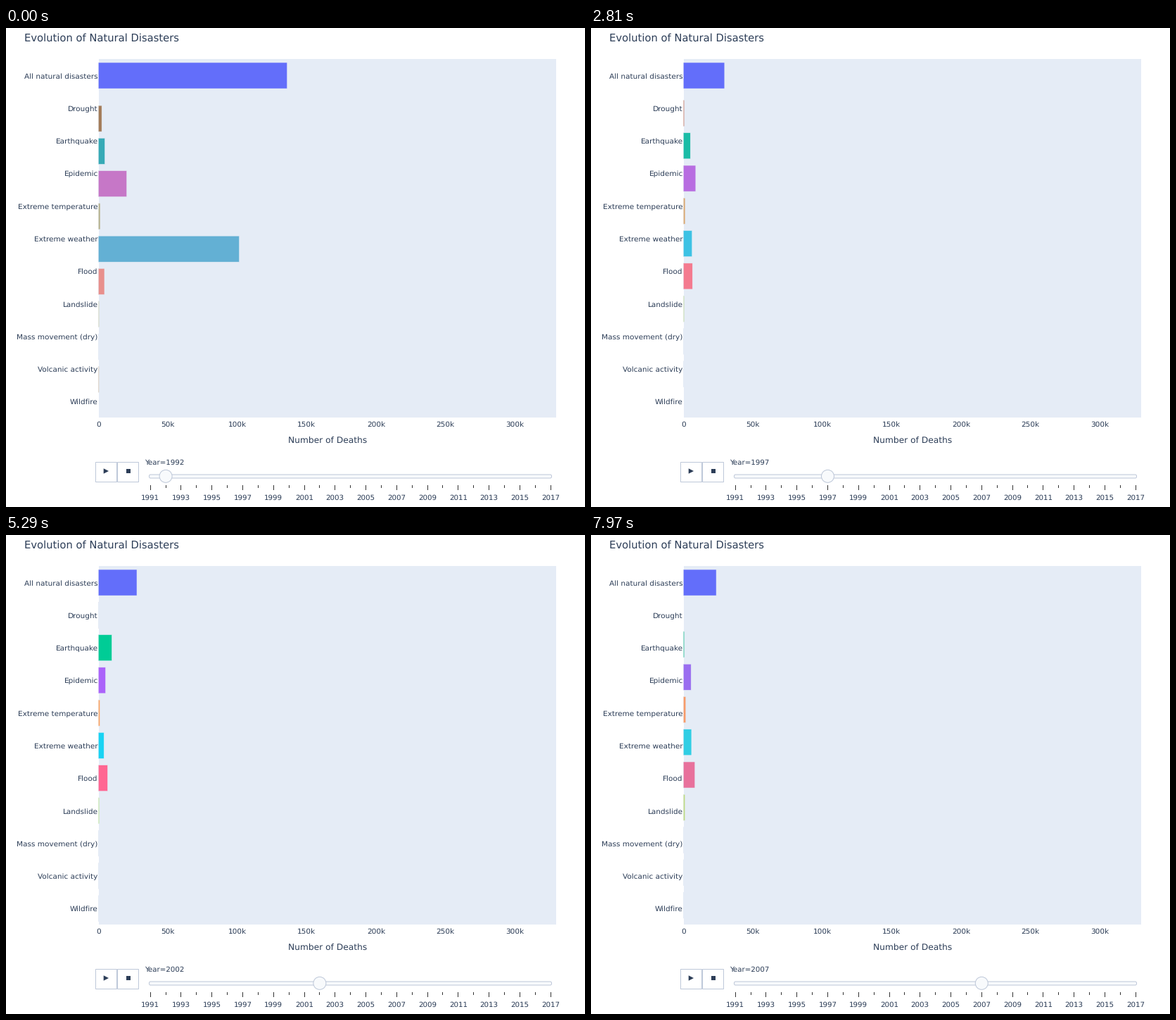
A matplotlib script that plays this animation: 823 px wide and 680 px high, repeating every 8000 ms.

```python
import numpy as np
import matplotlib.pyplot as plt
from matplotlib.animation import FuncAnimation
from matplotlib.colors import to_rgb
from matplotlib.patches import Circle, FancyBboxPatch, Polygon, Rectangle

W, H, DPI = 823, 680, 100
STEP, FRAMES = 40, 200
PT = 72 / DPI                     # points per pixel
INK, PLOT, BORDER, KNOB = "#2c3d57", "#E5ECF6", "#BEC8D9", "#F8FAFC"

X0, K = 131.3, 98.7 / 50          # zero line, pixels per thousand deaths
TOP, ROW, BAR = 44.4, 46.27, 37
TRACK, YEAR_STEP = 205.2, 21.88   # slider position of 1991, pixels per year
FADE = 500                        # length of one transition in ms

DROUGHT, QUAKE, EPIDEMIC, HEAT, STORM, FLOOD, SLIDE, DRY, VOLCANO, FIRE = NAMES = (
    "Drought", "Earthquake", "Epidemic", "Extreme temperature",
    "Extreme weather", "Flood", "Landslide", "Mass movement (dry)",
    "Volcanic activity", "Wildfire")
TOTAL = "All natural disasters"
ROWS = (TOTAL, *NAMES)
COLORS = [np.array(to_rgb(c)) for c in
          ("#636EFA", "#EF553B", "#00CC96", "#AB63FA", "#FFA15A", "#19D3F3",
           "#FF6692", "#B6E880", "#FF97FF", "#FECB52", "#636EFA")]

# Usual toll in thousands, drifting from the first year to the last
USUAL = {DROUGHT: (.2, .2), QUAKE: (3.4, 3.4), EPIDEMIC: (7.5, 4),
         HEAT: (.4, 1.5), STORM: (3.2, 6), FLOOD: (6, 7), SLIDE: (1, .6),
         DRY: (.04, .04), VOLCANO: (.05, .05), FIRE: (.06, .06)}
# Years that stand out
EVENTS = {
    1991: {DROUGHT: 2, EPIDEMIC: 29.8, STORM: 146.3, VOLCANO: .7},
    1993: {QUAKE: 10.1, EPIDEMIC: .5},
    1995: {QUAKE: 7.7},
    1996: {QUAKE: .6, EPIDEMIC: 13.9},
    1997: {DROUGHT: .7, EPIDEMIC: 10.4, STORM: 6.3, FLOOD: 7.6},
    1998: {QUAKE: 9.6, EPIDEMIC: 11.2, STORM: 24.9, FLOOD: 10.7},
    1999: {QUAKE: 21.9, STORM: 12.3, FLOOD: 34.8},
    2000: {QUAKE: .2, EPIDEMIC: 7, STORM: 1.4},
    2001: {QUAKE: 21.4, STORM: 1.9},
    2003: {QUAKE: 29.6, EPIDEMIC: 3.5, HEAT: 74.7, STORM: 1, FLOOD: 3.9},
    2004: {QUAKE: 227.3, EPIDEMIC: 3.2},
    2005: {QUAKE: 76.2},
    2006: {QUAKE: 6.7, HEAT: 4.8},
    2007: {QUAKE: .8, EPIDEMIC: 5.4, FLOOD: 8.6},
}
DROUGHT_YEARS = {1991, *range(1997, 2007)}

YEARS = np.arange(1992, 2008)
STARTS = np.interp(YEARS, [1992, 1997, 2000, 2004, 2007],
                   [-160, 2378, 3960, 5948, 7510])


def traces(year):
    """Bars as (row, value, colour); a row without a record lets the rest move up."""
    drift = (year - 1991) / 16
    tolls = {n: a + (b - a) * drift for n, (a, b) in USUAL.items()}
    tolls.update(EVENTS.get(year, {}))
    if year not in DROUGHT_YEARS:
        del tolls[DROUGHT]
    tolls = {TOTAL: sum(tolls.values()), **tolls}
    rows = [ROWS.index(n) for n in tolls]
    return [(r, v, COLORS[r]) for r, v in zip(rows, tolls.values())]


plt.rcParams.update({"font.family": "DejaVu Sans", "text.hinting": "none"})
fig = plt.figure(figsize=(W / DPI, H / DPI), dpi=DPI, facecolor="white")
ax = fig.add_axes([0, 0, 1, 1])
ax.set_xlim(0, W)
ax.set_ylim(H, 0)
ax.axis("off")


def text(x, y, s, size=10.45, ha="center"):
    return ax.text(x, y, s, fontsize=size * PT, color=INK, ha=ha,
                   va="baseline", zorder=5)


def rect(x, y, w, h, fill, edge="none", lw=0, z=1):
    return ax.add_patch(Rectangle((x, y), w, h, facecolor=fill, edgecolor=edge,
                                  linewidth=lw * PT, zorder=z))


# Plot area, titles and axis labels
rect(X0, TOP, 782.3 - X0, 11 * ROW, PLOT)
rect(130.3, TOP, 2, 11 * ROW, "white", z=1.5)
text(26, 18.4, "Evolution of Natural Disasters", 14.8, "left")
text(457, 589.3, "Number of Deaths", 12.2)
for i, name in enumerate(ROWS):
    text(130.8, 71.6 + ROW * i, name, ha="right")
for i in range(7):
    text(X0 + 98.7 * i, 565.7, f"{50 * i}k" if i else "0")

# Buttons
for x in (127.5, 158.5):
    rect(x, 615.5, 30, 28, "white", BORDER, 1)
ax.add_patch(Polygon([(138.7, 625.3), (138.7, 632.7), (146, 629)],
                     facecolor=INK, edgecolor="none", zorder=2))
rect(171, 626, 6, 6, INK, z=2)

# Slider
ax.add_patch(FancyBboxPatch((203.5, 634), 572, 5,
                            boxstyle="round,pad=0,rounding_size=2",
                            facecolor=KNOB, edgecolor=BORDER,
                            linewidth=PT, zorder=1))
for i in range(27):
    x = TRACK + YEAR_STEP * i
    major = i % 2 == 0
    rect(int(x), 649, 1, 7 if major else 4, "#333333")
    if major:
        text(x, 669.4, str(1991 + i), 10.3)
knob = ax.add_patch(Circle((TRACK, 636.3), 9, facecolor=KNOB,
                           edgecolor=BORDER, linewidth=PT, zorder=3))
caption = text(196.8, 619.9, "", 10.3, "left")

bars = [rect(X0, TOP, 0, BAR, PLOT, PLOT, .5, 2) for _ in ROWS]
for bar in bars:
    bar.set_snap(False)


def draw(i):
    t = i * STEP
    n = np.searchsorted(STARTS, t, side="right") - 1
    year = int(YEARS[n])
    p = min((t - STARTS[n]) / FADE, 1)

    for bar in bars:
        bar.set_visible(False)
    for bar, old, new in zip(bars, traces(year - 1), traces(year)):
        row, value, color = (a + (b - a) * p for a, b in zip(old, new))
        bar.set_y(TOP + ROW * (row + .5) - BAR / 2)
        bar.set_width(K * value)
        bar.set_facecolor(np.clip(color, 0, 1))
        bar.set_visible(True)

    knob.set_center((TRACK + YEAR_STEP * (year - 1991), 636.3))
    caption.set_text(f"Year={year}")
    return [*bars, knob, caption]


anim = FuncAnimation(fig, draw, frames=FRAMES, interval=STEP,
                     repeat=True, repeat_delay=0, blit=False)
plt.show()
```
